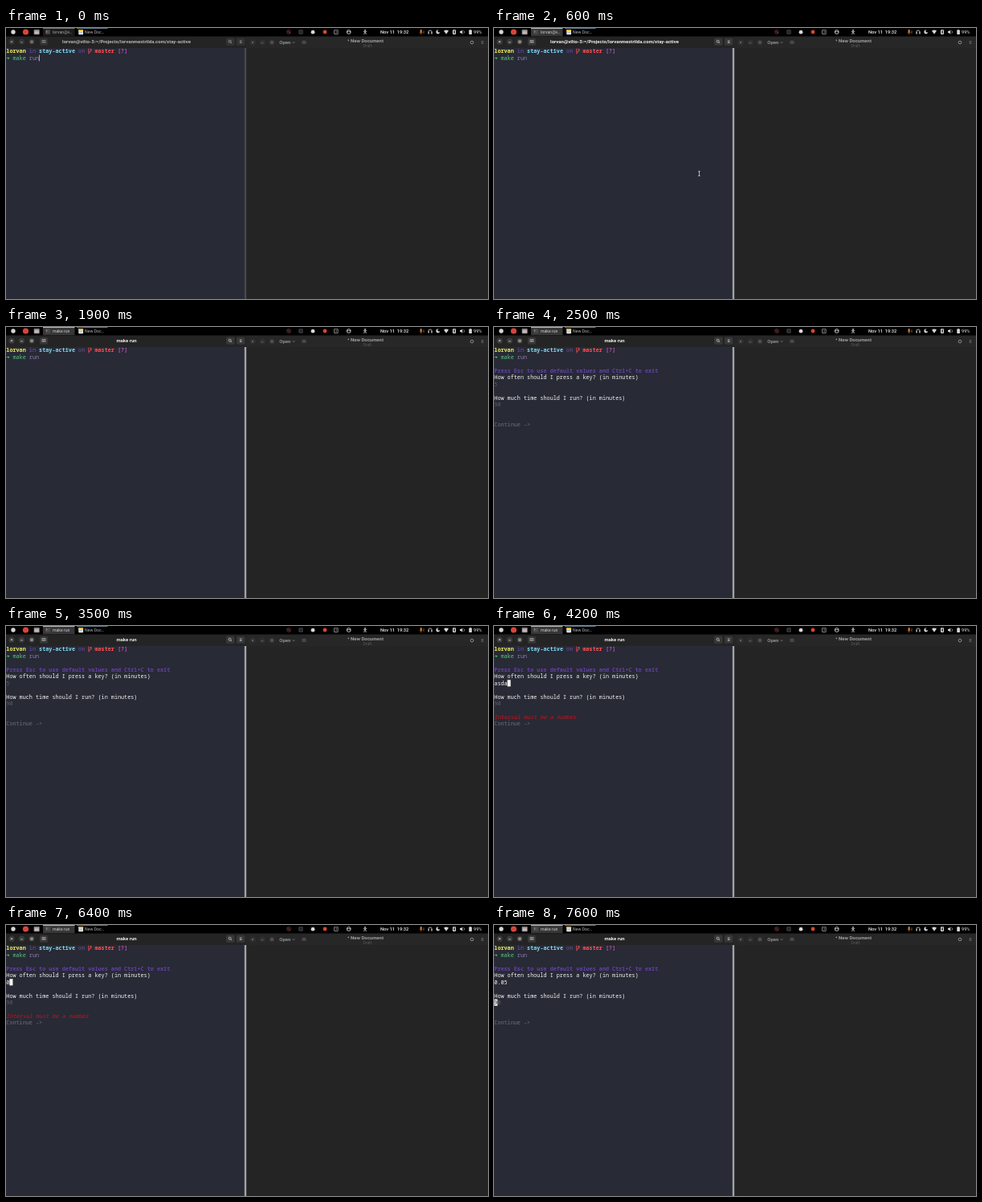
These frames come from a looping animation (600x338 px, 8 s). An HTML page with a canvas:

```html
<!DOCTYPE html>
<html lang="en">
<head>
<meta charset="utf-8">
<title>Terminal session</title>
<style>
html, body { margin: 0; width: 100%; height: 100%; overflow: hidden; background: #000; }
canvas { display: block; width: 100vw; height: 100vh; }
</style>
</head>
<body>
<canvas id="stage"></canvas>
<script>
const W = 600, H = 338, LOOP = 8000;
const CELL = 4.08, LINE = 8.45, TOP = 25;
const UI = 'Roboto, sans-serif';
const MONO = '"Noto Sans Mono", "DejaVu Sans Mono", monospace';
const USER = 'lorvan';
const SHELL_TITLE = USER + '@vilto-3:~/Projects/lorvanmestrilda.com/stay-active';
const WHITE = '#f4f4ef', DIM = '#5b5c64', TERM = '#282a36';

const canvas = document.getElementById('stage');
const ctx = canvas.getContext('2d');

// Contents of the first field over time: [start, text]
const TYPED = [
  [0, ''], [3600, 'a'], [3700, 'asd'], [3800, 'asda'],
  [5000, 'asd'], [5200, 'as'], [5300, 'a'], [5400, ''],
  [6400, '0'], [6600, '0.'], [6800, '0.0'], [7000, '0.05']
];

const clamp = v => Math.max(0, Math.min(1, v));
const span = (t, a, b) => clamp((t - a) / (b - a));
const within = (t, a, b) => t >= a && t < b;

function rect(x, y, w, h, color) {
  ctx.fillStyle = color;
  ctx.fillRect(x, y, w, h);
}

function box(x, y, w, h, r, color) {
  ctx.fillStyle = color;
  ctx.beginPath();
  ctx.roundRect(x, y, w, h, r);
  ctx.fill();
}

function dot(x, y, r, color) {
  ctx.fillStyle = color;
  ctx.beginPath();
  ctx.arc(x, y, r, 0, Math.PI * 2);
  ctx.fill();
}

function ring(x, y, r, color, width = 0.7) {
  ctx.strokeStyle = color;
  ctx.lineWidth = width;
  ctx.beginPath();
  ctx.arc(x, y, r, 0, Math.PI * 2);
  ctx.stroke();
}

function line(color, width, ...p) {
  ctx.strokeStyle = color;
  ctx.lineWidth = width;
  ctx.beginPath();
  ctx.moveTo(p[0], p[1]);
  for (let i = 2; i < p.length; i += 2) ctx.lineTo(p[i], p[i + 1]);
  ctx.stroke();
}

function label(text, x, y, size, color, weight = 400, align = 'left') {
  ctx.font = `${weight} ${size}px ${UI}`;
  ctx.fillStyle = color;
  ctx.textAlign = align;
  ctx.fillText(text, x, y);
}

function term(text, col, row, color, style = '') {
  ctx.font = `${style} 6.8px ${MONO}`;
  ctx.fillStyle = color;
  ctx.textAlign = 'left';
  ctx.fillText(text, 0.3 + col * CELL, TOP + 6.4 + row * LINE);
}

function block(col, row, char) {
  rect(0.3 + col * CELL, TOP + row * LINE, CELL, LINE - 0.3, WHITE);
  if (char) term(char, col, row, '#303038');
}

function drawTray() {
  const c = '#d8d8d8';
  ring(352, 5, 2.3, '#a83c3c');
  line('#888', 0.7, 350.7, 3.7, 353.3, 6.3);
  ctx.strokeStyle = '#777';
  ctx.strokeRect(365, 3, 4, 4);
  line('#777', 0.6, 366, 5, 368, 5);
  dot(382, 5.2, 2.4, c);
  dot(397, 5, 2.4, '#d9482b');
  ctx.strokeStyle = c;
  ctx.strokeRect(408.7, 2.8, 4.4, 4.6);
  line(c, 0.7, 410, 5, 412, 5);
  ring(426.7, 5, 2.4, c, 0.9);
  line(c, 0.7, 424.5, 4.6, 429, 4.6);
  dot(447, 2.8, 0.9, c);
  line(c, 0.8, 444.8, 4.3, 449.2, 4.3);
  line(c, 0.8, 445.6, 8, 447, 4.5, 448.4, 8);
  label('Nov 11', 466, 7.2, 5.7, '#eee', 500);
  label('19:32', 486.8, 7.2, 5.7, '#eee', 500);

  box(515.6, 2, 2, 4, 1, '#e78b3a');
  line('#e78b3a', 0.6, 514.8, 5, 516.6, 7, 518.4, 5);
  line('#e78b3a', 0.6, 516.6, 7, 516.6, 8.2);
  line('#e78b3a', 0.6, 520, 3.2, 520, 7);
  ctx.strokeStyle = c;
  ctx.lineWidth = 0.8;
  ctx.beginPath();
  ctx.arc(528, 5.2, 2.2, Math.PI, 0);
  ctx.stroke();
  rect(525.4, 5, 1.3, 2.5, c);
  rect(529.3, 5, 1.3, 2.5, c);
  dot(537.7, 5, 2.4, c);
  dot(538.8, 4.1, 1.5, '#000');
  ctx.fillStyle = c;
  ctx.beginPath();
  ctx.moveTo(545, 3.4);
  ctx.quadraticCurveTo(548, 1.6, 551, 3.4);
  ctx.lineTo(548, 7.8);
  ctx.fill();
  box(556, 2.3, 4, 5.6, 0.8, c);
  line('#222', 0.6, 557, 4, 559, 6, 558, 7, 558, 3, 559, 4, 557, 6);
  ctx.fillStyle = c;
  ctx.beginPath();
  ctx.moveTo(565, 4.1);
  ctx.lineTo(566.4, 4.1);
  ctx.lineTo(568.2, 2.4);
  ctx.lineTo(568.2, 7.8);
  ctx.lineTo(566.4, 6.1);
  ctx.lineTo(565, 6.1);
  ctx.fill();
  ctx.strokeStyle = c;
  ctx.beginPath();
  ctx.arc(568, 5.1, 2.5, -0.9, 0.9);
  ctx.stroke();
  box(576.3, 2.6, 3.6, 5.4, 0.6, c);
  rect(577.4, 1.9, 1.4, 0.8, c);
  label('99%', 582, 7.2, 5.6, '#eee');
}

function drawTopBar(t) {
  rect(0, 0, W, 10.5, '#000');
  dot(9, 5, 2.7, '#d6d6d6');
  dot(24.5, 5, 3.6, '#db4437');
  box(34.7, 2, 7, 6.2, 0.8, '#8c8c8c');
  rect(35.5, 4, 5.4, 3.2, '#c9b5b9');

  const active = t >= 500;
  rect(46, 0, 39.5, 10.2, active ? '#373737' : '#1b1b1b');
  rect(46, 0, 39.5, 0.8, active ? '#d8d8d8' : '#8a8a8a');
  rect(88, 0, 38.5, 0.8, '#7890a5');
  box(49, 2.3, 6, 5.4, 0.7, '#4a4a4a');
  line('#ddd', 0.5, 50, 3.5, 51.2, 4.5, 50, 5.5);
  label(t < 1400 ? USER + '@v…' : 'make run', 58, 7, 5.2, active ? '#cfcfcf' : '#a8a8a8');
  box(90.3, 2, 5.8, 6.2, 0.7, '#e8e8e8');
  rect(90.3, 2, 5.8, 2, '#e5b93c');
  line('#5b92d6', 0.7, 91.3, 5.8, 95, 5.8);
  label('New Doc…', 98, 7, 5.2, '#b4b4b4');
  drawTray();
}

function windowButtons(xs, y, fill, ink) {
  xs.forEach(x => dot(x, y, 3.6, fill));
  const [a, b, c] = xs;
  line(ink, 0.7, a - 1.1, y - 1.1, a + 1.1, y + 1.1);
  line(ink, 0.7, a + 1.1, y - 1.1, a - 1.1, y + 1.1);
  line(ink, 0.7, b - 1.3, y + 0.6, b + 1.3, y + 0.6);
  ctx.strokeStyle = ink;
  ctx.strokeRect(c - 1.1, y - 1.1, 2.2, 2.2);
}

function menuLines(x, y, color) {
  for (let i = -1; i <= 1; i++) line(color, 0.6, x - 1.4, y + i * 1.3, x + 1.4, y + i * 1.3);
}

function tabIcon(x, y, color) {
  line(color, 0.6, x - 2, y + 2, x - 2, y - 1.5, x + 2, y - 1.5, x + 2, y + 2);
  line(color, 0.6, x, y - 0.6, x, y + 2);
  line(color, 0.6, x - 1.2, y + 0.7, x + 1.2, y + 0.7);
}

function drawEditor() {
  rect(299, 10.5, 301, 327.5, '#242424');
  rect(299, 10.5, 301, 14.5, '#272727');
  windowButtons([307, 319, 331], 18, '#303030', '#777');
  label('Open', 340.3, 20.3, 6, '#929292', 700);
  line('#929292', 0.7, 356.6, 17.4, 358, 18.8, 359.4, 17.4);
  tabIcon(371, 18, '#777');
  dot(426.3, 15.4, 0.8, '#a0a0a0');
  label('New Document', 429, 17.6, 6, '#a0a0a0', 700);
  label('Draft', 450, 24, 5, '#575757', 400, 'center');
  ring(580, 18, 1.7, '#858585', 0.9);
  for (let i = 0; i < 8; i++) {
    const c = Math.cos(i * Math.PI / 4), s = Math.sin(i * Math.PI / 4);
    line('#858585', 0.6, 580 + c * 1.7, 18 + s * 1.7, 580 + c * 2.6, 18 + s * 2.6);
  }
  menuLines(593, 18, '#858585');
}

function drawHeader(t) {
  const focus = span(t, 0, 200);
  rect(0, 10.5, 299, 14.5, '#242424');
  ctx.globalAlpha = 0.72 + 0.28 * focus;
  windowButtons([7, 19.5, 32], 17.2, '#3a3a3a', '#e4e4e4');
  box(42, 12.8, 10, 9, 1.6, '#373737');
  tabIcon(47, 17, '#ddd');
  box(274, 12.6, 10.5, 9.2, 1.6, '#373737');
  ring(278.7, 16.7, 1.5, '#ddd');
  line('#ddd', 0.7, 279.8, 17.8, 281, 19);
  box(287, 12.6, 10.5, 9.2, 1.6, '#373737');
  menuLines(292.2, 17.2, '#ddd');
  label(t < 1400 ? SHELL_TITLE : 'make run', 150, 19.2, 6, '#f0f0f0', 700, 'center');
  ctx.globalAlpha = 1;
}

function drawPrompt(t) {
  term(USER, 0, 0, '#f0f15a', 'bold');
  term('in', 7, 0, '#7150ac');
  term('stay-active', 10, 0, '#80dcf4', 'bold');
  term('on', 22, 0, '#7150ac');
  line('#ff5050', 0.9, 103, 25.6, 103, 32.4);
  line('#ff5050', 0.8, 103, 30.6, 106, 29, 106, 27);
  dot(105.6, 26.8, 0.9, '#ff5050');
  term('master', 27, 0, '#ff5050', 'bold');
  term('[?]', 34, 0, '#b94fb5', 'bold');
  term('➜', 0, 1, '#55dc7b', 'bold');
  term('make', 2, 1, '#57c878');
  term('run', 7, 1, '#8d80b2');
  if (t < 200) rect(41, 33.6, 0.7, 7.8, '#d8d8d8');
}

function drawForm(t) {
  const value = TYPED.filter(([start]) => start <= t).pop()[1];
  const blinkOn = t >= 2100 && !within(t, 2500, 3000) && !within(t, 3500, 3600);

  term('Press Esc to use default values and Ctrl+C to exit', 0, 3, '#6541a8', 'bold');
  term('How often should I press a key? (in minutes)', 0, 4, WHITE);
  term(value || '5', 0, 5, value ? WHITE : DIM);
  if (blinkOn && t < 7500) block(value.length, 5, value ? '' : '5');

  term('How much time should I run? (in minutes)', 0, 7, WHITE);
  term('90', 0, 8, DIM);
  if (t >= 7600) block(0, 8, '9');

  if (within(t, 4200, 7500)) term('Interval must be a number', 0, 10, '#cf1018', 'italic');
  term('Continue ->', 0, 11, '#6d6e75');
}

function drawPointer(t) {
  if (!within(t, 400, 1300)) return;
  const p = span(t, 400, 1000), k = 1 - (1 - p) ** 2;
  const x = 396 - 252 * k, y = 210 - 51 * k;
  for (const [color, w] of [['#111', 1.6], ['#eee', 0.8]]) {
    line(color, w, x, y - 2.6, x, y + 2.6);
    line(color, w, x - 1.4, y - 2.7, x + 1.4, y - 2.7);
    line(color, w, x - 1.4, y + 2.7, x + 1.4, y + 2.7);
  }
}

function draw(t) {
  const dpr = window.devicePixelRatio || 1;
  const w = Math.round(innerWidth * dpr), h = Math.round(innerHeight * dpr);
  if (canvas.width !== w || canvas.height !== h) {
    canvas.width = w;
    canvas.height = h;
  }
  ctx.setTransform(w / W, 0, 0, h / H, 0, 0);
  rect(0, 0, W, H, TERM);
  drawEditor();
  drawHeader(t);
  rect(296.8, 25, 2.4, 313, t < 500 ? '#48494f' : '#a2a2a2');
  drawPrompt(t);
  if (t >= 2000) drawForm(t);
  drawTopBar(t);
  drawPointer(t);
}

const began = performance.now();
function tick() {
  draw((performance.now() - began) % LOOP);
  requestAnimationFrame(tick);
}
tick();
</script>
</body>
</html>
```
